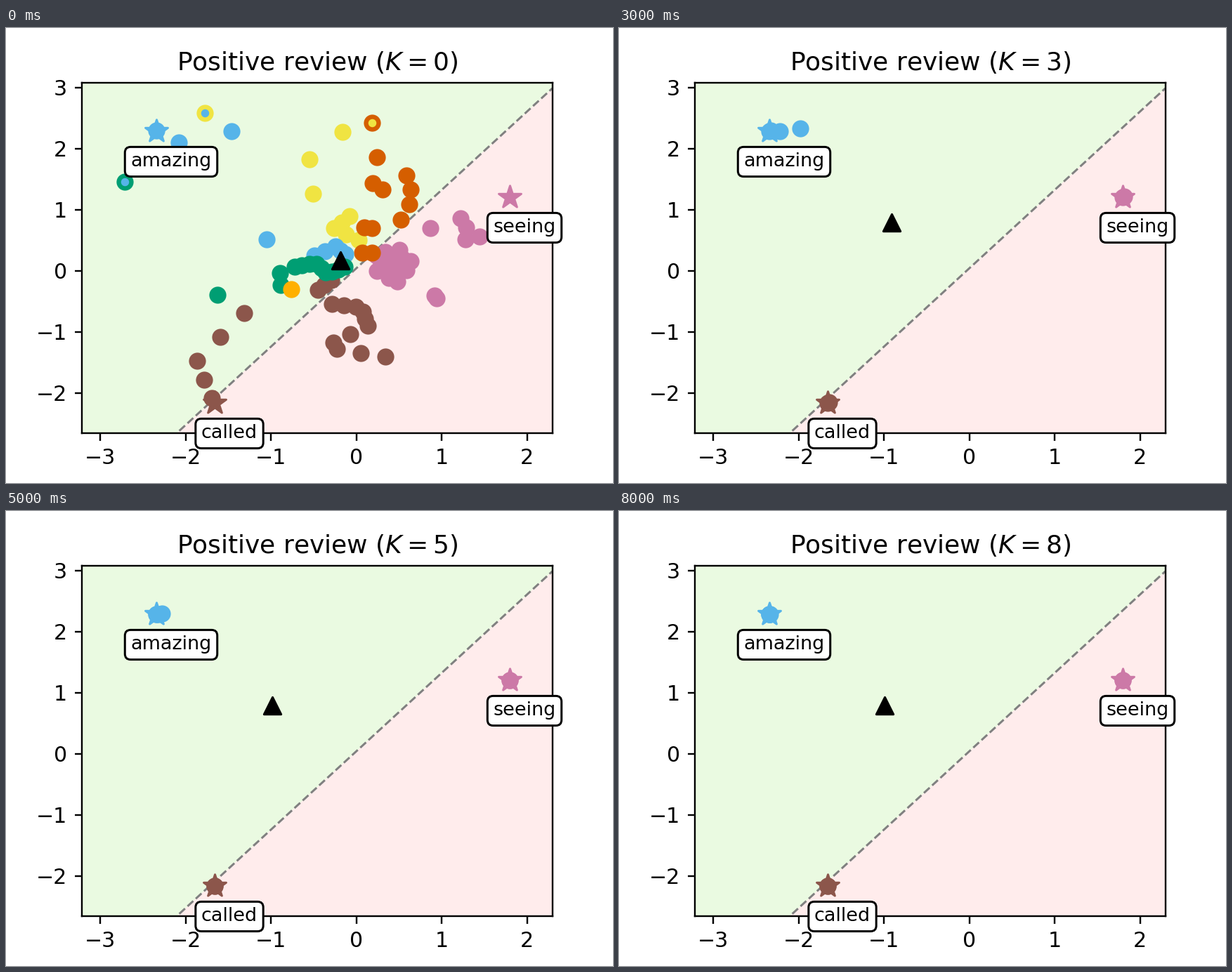
Recreate the animation shown at these times as a matplotlib script. Size 864 by 648 pixels, loop 9000 ms.

```python
import numpy as np
import matplotlib.pyplot as plt
from matplotlib.animation import FuncAnimation

plt.rcParams["font.family"] = "DejaVu Sans"

BLUE, YELLOW, RED, PINK = "#56b4e9", "#f0e442", "#d55e00", "#cc79a7"
GREEN, BROWN, ORANGE = "#009e73", "#8c564b", "#ffb000"
STEPS = 9
PATTERNS = {"amazing": (BLUE, (214.5, 146.5)),
            "seeing": (PINK, (717.5, 240.5)),
            "called": (BROWN, (297.5, 533.5))}


def to_data(points):
    """Stage pixels to plot coordinates."""
    p = np.reshape(points, (-1, 2))
    return np.column_stack([(p[:, 0] - 499) / 121.5, (345.5 - p[:, 1]) / 87])


def trail(n, *keys):
    """n points spaced evenly along a polyline."""
    keys = np.array(keys, float)
    t = np.linspace(0, len(keys) - 1, n)
    return np.column_stack([np.interp(t, range(len(keys)), c) for c in keys.T])


def blob(n, cx, cy, rx, ry):
    """n points in a sunflower spiral filling an ellipse."""
    k = np.arange(n)
    r, a = np.sqrt((k + 1) / n), k * 2.39996
    return np.column_stack([cx + rx * r * np.cos(a), cy + ry * r * np.sin(a)])


def scattered():
    return [
        (BROWN, trail(5, (339, 406), (272, 474), (293, 527))),
        (BROWN, trail(3, (444, 373), (463, 359))),
        (BROWN, trail(11, (464, 393), (507, 398), (515, 424), (454, 454),
                      (540, 468))),
        (PINK, blob(14, 550, 337, 27, 27)),
        (PINK, trail(5, (604, 285), (662, 266), (648, 302), (674, 297))),
        (PINK, trail(2, (610, 381), (613, 385))),
        (YELLOW, trail(3, (479, 148), (432, 187), (437, 236))),
        (YELLOW, trail(5, (489, 268), (467, 285), (502, 302))),
        (RED, trail(7, (528, 184), (519, 239), (570, 210), (580, 239),
                    (562, 273))),
        (RED, trail(2, (510, 284), (521, 285))),
        (RED, trail(2, (507, 320), (521, 320))),
        (BLUE, trail(4, (214, 146), (246, 163), (321, 147), (371, 301))),
        (BLUE, trail(5, (439, 324), (469, 311), (483, 322))),
        (GREEN, trail(3, (301, 380), (390, 349), (391, 366))),
        (GREEN, trail(9, (411, 340), (440, 334), (458, 349), (482, 340))),
        (ORANGE, (406, 372)),
    ]


def grouped():
    return [
        (BROWN, trail(12, (296, 526), (292, 510), (337, 479), (359, 497),
                      (369, 515), (344, 510))),
        (PINK, blob(14, 682, 265, 23, 18)),
        (RED, blob(12, 527, 169, 13, 20)),
        (GREEN, trail(2, (209, 267), (235, 262))),
        (BLUE, trail(3, (213, 146), (224, 151), (247, 146))),
        (BLUE, trail(6, (342, 129), (326, 149), (348, 175))),
        (BLUE, trail(5, (236, 257), (262, 255))),
        (BLUE, (293, 200)),
    ]


def tight():
    return [
        (BROWN, blob(10, 308, 525, 11, 7)),
        (PINK, blob(8, 705, 247, 7, 6)),
        (YELLOW, (221, 144)),
        (YELLOW, blob(8, 405.5, 139, 3, 6)),
        (BLUE, trail(8, (210, 150), (238, 158), (254, 150), (271, 135))),
    ]


def settling(k):
    """The last stragglers close in on the three patterns."""
    lag = 0.42 ** (k - 4)
    groups = [(color, trail(2, p, np.add(p, (lag, -lag / 2))))
              for color, p in PATTERNS.values()]
    x, y = PATTERNS["amazing"][1]
    tail = trail(2, (x + 6.5 * lag, y), (x + 18.5 * lag, y - 1.5 * lag))
    return groups + [(BLUE, tail)]


def tokens(k):
    early = (scattered, grouped, tight)
    return early[k]() if k < 3 else settling(k)


# Ringed tokens: outer and inner colour, position at K = 0 and K = 1
RINGS = [(RED, YELLOW, (521, 135), (354, 126)),
         (YELLOW, BLUE, (283, 121), (235, 139)),
         (GREEN, BLUE, (169, 219), (202, 168))]


def query_at(k):
    decay = np.exp([-0.5 * k - 0.08 * k**2, -0.755 * k - 0.275 * k**2])
    return np.array([378, 276.5]) + np.array([98.5, 54.5]) * decay


fig, ax = plt.subplots(figsize=(4, 3), dpi=216)
xlim, ylim = np.array([-3.214, 2.297]), (-2.652, 3.083)
ax.set(xlim=xlim, ylim=ylim, xticks=range(-3, 3), yticks=range(-2, 4))

border = 1.283 * xlim + 0.042
ax.set_facecolor("#eafae1")
ax.fill_between(xlim, -5, border, color="#ffecec", lw=0, zorder=0)
ax.plot(xlim, border, "--", color="gray", lw=1, zorder=1)

for word, (color, pos) in PATTERNS.items():
    at = to_data(pos)[0]
    ax.scatter(*at, s=125, marker="*", color=color, zorder=5)
    ax.annotate(word, at, xytext=(7, -14.5), textcoords="offset points",
                ha="center", va="center", fontsize=9, zorder=8,
                bbox=dict(boxstyle="round,pad=0.3", fc="white", ec="black"))

query = ax.scatter([0], [0], s=66, marker="^", color="black", zorder=6)
title = ax.set_title("Positive review ($K=0$)")
dots = []


def dot(color, points, size=50):
    dots.append(ax.scatter(*to_data(points).T, s=size, color=color, zorder=3))


def draw(k):
    while dots:
        dots.pop().remove()
    if k < 2:
        for outer, inner, *path in RINGS:
            dot(outer, path[k])
            dot(inner, path[k], 8)
    for color, points in tokens(k):
        dot(color, points)
    query.set_offsets(to_data(query_at(k)))
    title.set_text(f"Positive review ($K={k}$)")
    return dots + [query, title]


anim = FuncAnimation(fig, draw, frames=STEPS, interval=1000, repeat=True,
                     repeat_delay=0, blit=False)
plt.show()
```
